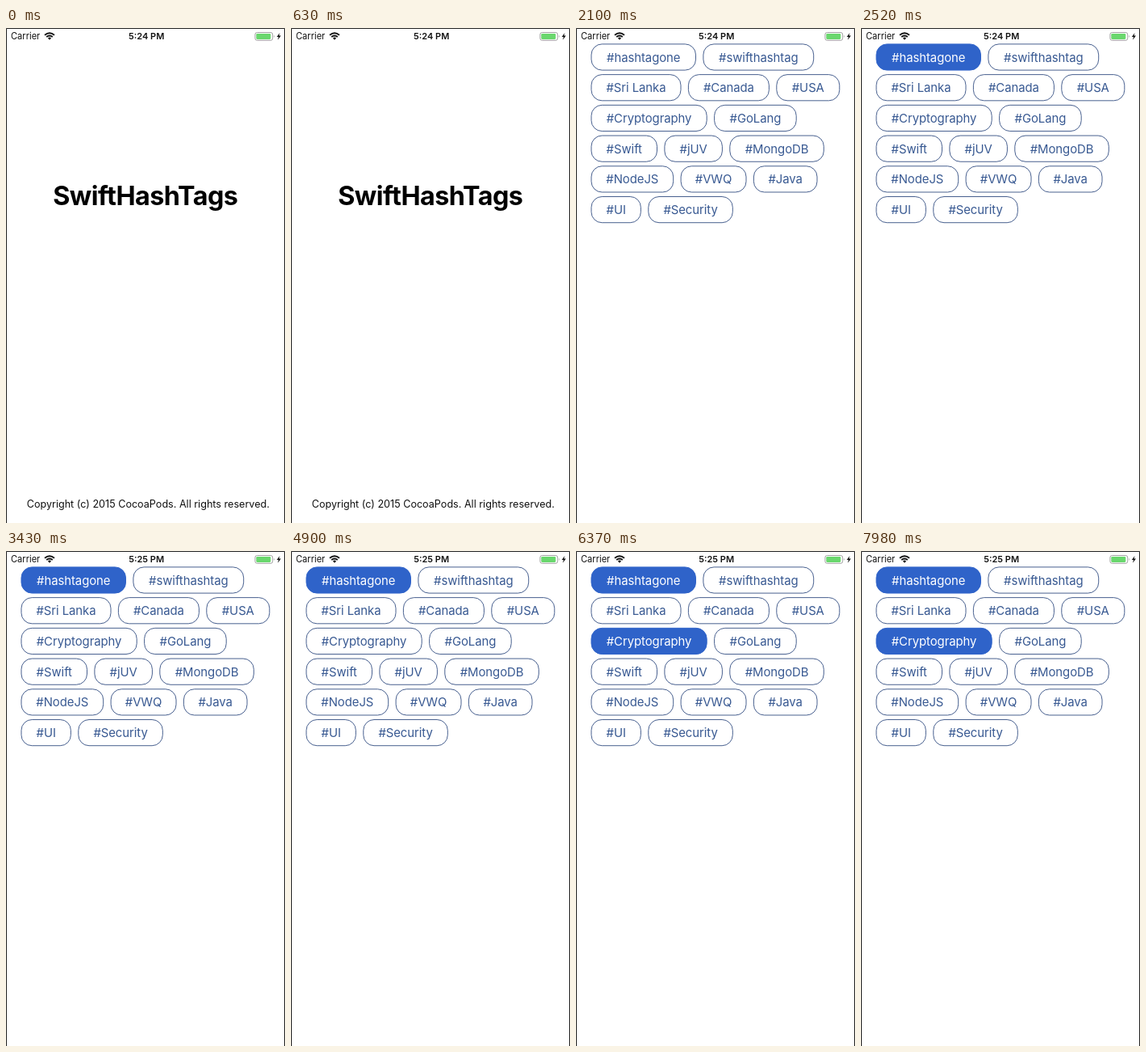
Recreate the animation shown at these times as an HTML page. Size 346 by 612 pixels, loop 8 s.

```html
<!DOCTYPE html>
<html lang="en">
<head>
<meta charset="utf-8">
<title>Hashtags</title>
<style>
  html, body { margin: 0; width: 100%; height: 100%; overflow: hidden; background: #fff; }
  svg { display: block; width: 346px; height: 612px; }
  text { font-family: Inter, Roboto, sans-serif; font-optical-sizing: none; }
  .middle { text-anchor: middle; }
  .status { font-size: 11.1px; fill: #111; }
  .clock { font-weight: 600; font-size: 11px; }
  .title { font-weight: 700; font-size: 32.3px; letter-spacing: -.52px; }
  .legal { font-size: 12.6px; fill: #111; }
  .tag { font-size: 14.9px; letter-spacing: -.06px; }
</style>
</head>
<body>
<svg viewBox="0 0 346 612">
  <g id="launch">
    <text class="title middle" x="172.8" y="219">SwiftHashTags</text>
    <text class="legal middle" x="176.3" y="592.5">Copyright (c) 2015 CocoaPods. All rights reserved.</text>
  </g>
  <g id="tags"></g>

  <text class="status" x="6" y="14.3">Carrier</text>
  <g fill="none" stroke="#111" stroke-width="1.9">
    <path d="M48 8.8Q54 3.8 60 8.8M50.2 11.1Q54 8 57.8 11.1"/>
    <path d="M51.9 12.4Q54 10.8 56.1 12.4L54 14.7Z" fill="#111" stroke="none"/>
  </g>
  <text id="clock" class="status clock middle" x="174.2" y="14.3"></text>
  <rect x="308.9" y="5.5" width="21.8" height="9.8" rx="2.5" fill="#fff" stroke="#999" stroke-width=".9"/>
  <rect x="310.3" y="6.9" width="18" height="7" rx="1.3" fill="#69d76d"/>
  <path d="M332 8.8Q333.6 10.4 332 12Z" fill="#999"/>
  <path d="M339.5 6L335.8 10.9H338L336.9 14.8L341 9.5H338.6Z" fill="#111"/>

  <path d="M.5 612V.5H345.5V612" fill="none" stroke="#222"/>
</svg>
<script>
const LOOP = 8000, STEP = 70, FADE = 300;
const BLUE = [56, 89, 146], WHITE = [255, 255, 255];
const BORDER = '#48608f', SELECTED = '#2f63c9';

// Each row lists its tags with the pill widths.
const rows = [
  [['hashtagone', 129.5], ['swifthashtag', 136.8]],
  [['Sri Lanka', 111], ['Canada', 100], ['USA', 78]],
  [['Cryptography', 143.2], ['GoLang', 101.6]],
  [['Swift', 81.5], ['jUV', 71.5], ['MongoDB', 116.5]],
  [['NodeJS', 101.7], ['VWQ', 80.9], ['Java', 78.6]],
  [['UI', 61.4], ['Security', 104.5]]
];
const selectedAt = { hashtagone: 2230, Cryptography: 5870 };

const byId = id => document.getElementById(id);
const launch = byId('launch'), tagLayer = byId('tags'), clock = byId('clock');

function add(name, attributes) {
  const node = document.createElementNS('http://www.w3.org/2000/svg', name);
  for (const key in attributes) node.setAttribute(key, attributes[key]);
  return tagLayer.appendChild(node);
}

const tags = rows.flatMap((row, index) => {
  let x = 19;
  const y = 19.9 + index * 37.72;
  return row.map(([name, width]) => {
    const pill = add('rect', { x, y, width, height: 32.2, rx: 13.2 });
    const label = add('text', { class: 'tag middle', x: x + width / 2, y: y + 21.6 });
    label.textContent = '#' + name;
    x += width + 9.4;
    return { pill, label, start: selectedAt[name] ?? Infinity };
  });
});

const smooth = p => p * p * (3 - 2 * p);
const mix = p => `rgb(${BLUE.map((c, i) => Math.round(c + (WHITE[i] - c) * p))})`;

function draw(now) {
  const time = Math.floor(now % LOOP / STEP) * STEP;
  const launching = time < 980;
  launch.style.display = launching ? '' : 'none';
  tagLayer.style.display = launching ? 'none' : '';
  clock.textContent = time < 3080 ? '5:24 PM' : '5:25 PM';

  for (const { pill, label, start } of tags) {
    const selected = time >= start;
    const progress = Math.min(1, Math.max(0, (time - start) / FADE));
    pill.setAttribute('fill', selected ? SELECTED : '#fff');
    pill.setAttribute('stroke', selected ? SELECTED : BORDER);
    label.setAttribute('fill', mix(smooth(progress)));
  }
}

const origin = performance.now();
function tick() {
  draw(performance.now() - origin);
  requestAnimationFrame(tick);
}
tick();
</script>
</body>
</html>
```
